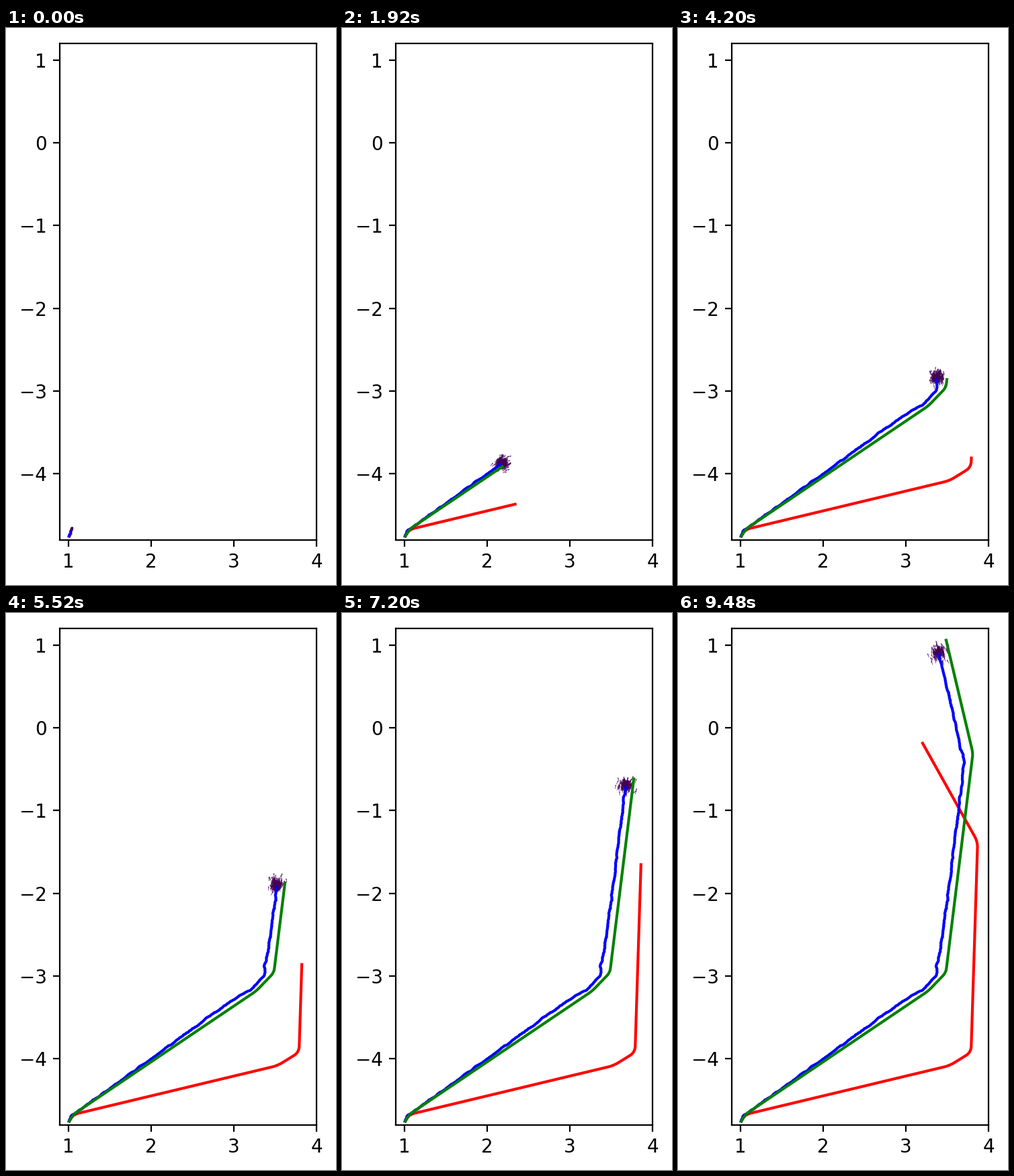
A matplotlib script that plays this animation: 491 by 830 pixels, repeating every 9.6 s.

```python
import numpy as np
import matplotlib.pyplot as plt
from matplotlib.animation import FuncAnimation

W, H, DPI = 491, 830, 200
FRAMES, INTERVAL = 80, 120
LEFT, BOTTOM, UNIT = 80.22, 67.4, 123.2      # axes origin and scale in pixels
XLIM, YLIM = (0.9, 4), (-4.8, 1.2)
STEP = 0.01                                  # path sampling distance
N_PARTICLES = 220

START = (1.016, -4.755)
RED = [START, (1.052, -4.678), (3.528, -4.085), (3.788, -3.924),
       (3.868, -1.378), (3.203, -0.185)]
GREEN = [START, (1.061, -4.675), (3.268, -3.184), (3.484, -2.961),
         (3.811, -0.307), (3.487, 1.061)]
BLUE = [START, (1.061, -4.67), (1.174, -4.6), (2.887, -3.358),
        (3.22, -3.148), (3.382, -2.993), (3.37, -2.839), (3.398, -2.823),
        (3.431, -2.579), (3.528, -1.889), (3.673, -0.704), (3.705, -0.396),
        (3.666, -0.274), (3.61, 0.002), (3.403, 0.895)]


class Track:
    """Polyline with rounded corners, travelled at constant speed."""

    def __init__(self, corners, color, rounding, head_start=0.0, wobble=0.0):
        corners = np.array(corners)
        arc = np.append(0, np.cumsum(np.hypot(*np.diff(corners, axis=0).T)))
        t = np.linspace(0, arc[-1], int(arc[-1] / STEP))
        pts = np.column_stack([np.interp(t, arc, c) for c in corners.T])
        pts += np.random.default_rng(4).normal(0, wobble, pts.shape)
        half = int(rounding / STEP / 2)
        kernel = np.full(2 * half + 1, 1 / (2 * half + 1))
        padded = np.pad(pts, ((half, half), (0, 0)), mode="reflect",
                        reflect_type="odd")
        self.pts = np.column_stack([np.convolve(c, kernel, "valid")
                                    for c in padded.T])
        self.color = color
        self.head_start = head_start

    def index(self, frame):
        done = frame / (FRAMES - 1)
        share = self.head_start + (1 - self.head_start) * done
        return share * (len(self.pts) - 1)

    def at(self, i):
        return np.array([np.interp(i, np.arange(len(self.pts)), c)
                         for c in self.pts.T])

    def upto(self, frame):
        i = self.index(frame)
        return np.vstack([self.pts[:int(np.ceil(i))], self.at(i)])

    def pose(self, frame):
        i = self.index(frame)
        tip = self.at(i)
        dx, dy = tip - self.at(max(i - 15, 0))
        return tip, np.arctan2(dy, dx)


def particles(frame):
    """Tails and headings of the cloud around the estimate."""
    rng = np.random.default_rng(100 + frame)
    tip, heading = blue.pose(frame)
    grow = min(1, 0.1 + frame / 10)
    scale = rng.choice([0.03, 0.055], N_PARTICLES, p=[0.7, 0.3])
    offset = np.clip(rng.normal(size=(N_PARTICLES, 2)), -2.2, 2.2)
    offset *= scale[:, None] * grow
    return tip + offset, heading + rng.normal(0, 0.25, N_PARTICLES) * grow


fig = plt.figure(figsize=(W / DPI, H / DPI), dpi=DPI, facecolor="white")
ax = fig.add_axes([LEFT / W, BOTTOM / H,
                   (XLIM[1] - XLIM[0]) * UNIT / W,
                   (YLIM[1] - YLIM[0]) * UNIT / H])
ax.set(xlim=XLIM, ylim=YLIM, xticks=range(1, 5), yticks=range(-4, 2))

red = Track(RED, "red", 0.14, head_start=0.004)
blue = Track(BLUE, "blue", 0.06, head_start=0.007, wobble=0.01)
green = Track(GREEN, "green", 0.1)
tracks = [red, blue, green]
lines = [ax.plot([], [], color=t.color, lw=1.5)[0] for t in tracks]

zeros = np.zeros(N_PARTICLES)
cloud = ax.quiver(zeros, zeros, zeros, zeros, color="#440154", angles="xy",
                  units="xy", scale_units="xy", scale=1, width=0.005,
                  zorder=1.5)


def draw(frame):
    for line, track in zip(lines, tracks):
        line.set_data(*track.upto(frame).T)
    tails, theta = particles(frame)
    cloud.set_offsets(tails)
    cloud.set_UVC(0.055 * np.cos(theta), 0.055 * np.sin(theta))
    return [*lines, cloud]


anim = FuncAnimation(fig, draw, frames=FRAMES, interval=INTERVAL,
                     repeat=True, repeat_delay=0, blit=False)
plt.show()
```
